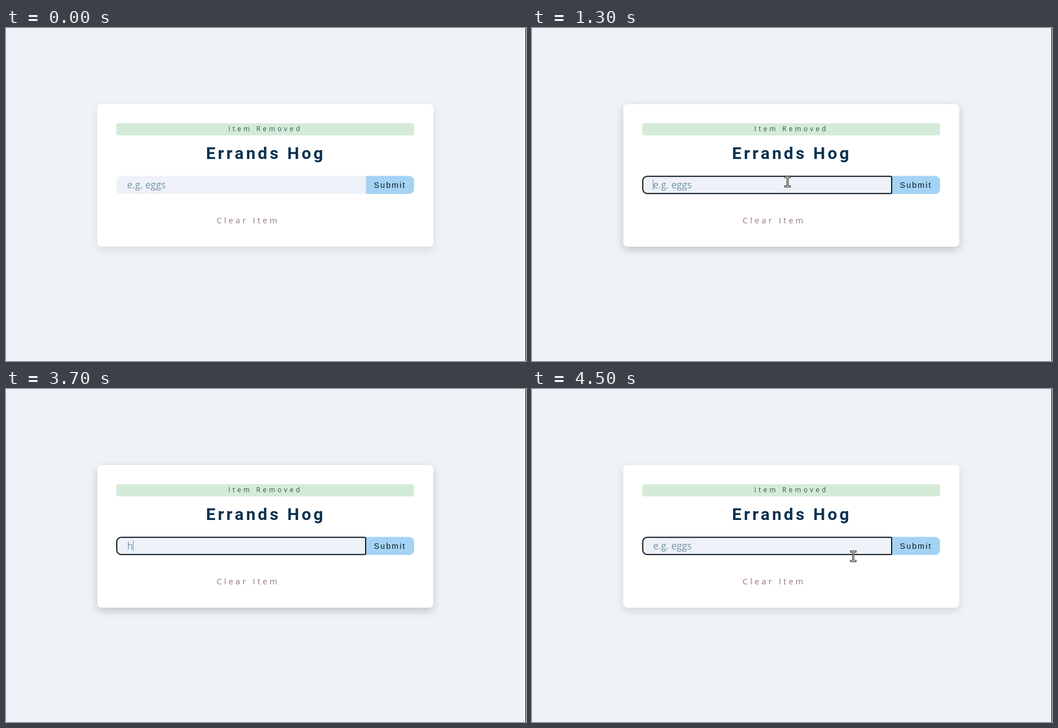
Write an HTML page with a canvas that moves like this. It is 934 px wide and 600 px high and loops after 4600 ms.

```html
<!DOCTYPE html>
<html lang="en">
<head>
<meta charset="utf-8">
<title>Shopping list</title>
<style>
  html, body { margin: 0; width: 100%; height: 100%; overflow: hidden; background: #eff3f8; }
  canvas { display: block; }
</style>
</head>
<body>
<canvas id="stage" width="934" height="600"></canvas>
<script>
const ctx = document.getElementById('stage').getContext('2d');
const LOOP = 4600, STEP = 100;
const REM = 17.23;
const WIDE = REM / 4;
const COLORS = {
  page: '#eff3f8', field: '#eef2f8', alert: '#d4ebd9', alertText: '#35514f',
  title: '#0a3150', hint: '#7093a6', submit: '#a5d3f5', ink: '#0d161d',
  clear: '#97727a', edit: '#639a78', trash: '#b96d6d', yellow: '#f3e52f'
};

function box(x, y, w, h, radius, fill) {
  ctx.beginPath();
  ctx.roundRect(x, y, w, h, radius);
  ctx.fillStyle = fill;
  ctx.fill();
}

function text(str, x, y, font, color, spacing = 0, align = 'left') {
  ctx.font = font;
  ctx.letterSpacing = spacing + 'px';
  ctx.textAlign = align;
  ctx.fillStyle = color;
  ctx.fillText(str, x, y);
  return ctx.measureText(str).width;
}

const openSans = size => `${size}px "Open Sans", sans-serif`;
const clamp01 = v => Math.min(1, Math.max(0, v));
const mix = (a, b, k) => a + (b - a) * k;

function outlined(path, fill, width = 1.2) {
  ctx.fillStyle = fill;
  ctx.strokeStyle = '#111';
  ctx.lineWidth = width;
  ctx.lineJoin = 'round';
  ctx.fill(path);
  ctx.stroke(path);
}

const pointers = {
  beam() {
    const serifs = new Path2D('M-4-8.5H-1L0-7.5L1-8.5H4M0-7.5V7.5M-4 8.5H-1L0 7.5L1 8.5H4');
    ctx.lineCap = 'square';
    for (const [width, color] of [[3.4, '#15150f'], [1.3, '#f6f3d4']]) {
      ctx.lineWidth = width;
      ctx.strokeStyle = color;
      ctx.stroke(serifs);
    }
    ctx.lineCap = 'butt';
  },
  arrow() {
    outlined(new Path2D('M0 0V16L4 12.5L7 19L10 17.5L7 11.5H12Z'), COLORS.yellow);
  },
  hand() {
    outlined(new Path2D(
      'M-1.5 1Q0-1 1.5 1V8Q3 6.5 4.5 8.5Q6 7.2 7.6 9.2Q9.5 8 11 10.5V16' +
      'Q10.5 18 9.5 20V23H0V20L-4 14.5Q-5.5 11.5-3.5 11.5L-1.5 13Z'), COLORS.yellow);
  }
};

function pointer({ kind, x, y }) {
  ctx.save();
  ctx.translate(x, y);
  pointers[kind]();
  ctx.restore();
}

function editIcon(x, y) {
  ctx.strokeStyle = ctx.fillStyle = COLORS.edit;
  ctx.lineWidth = 1.7;
  ctx.stroke(new Path2D(`M${x + 8} ${y + 2}H${x + 1}V${y + 12}H${x + 11}V${y + 8}`));
  ctx.fill(new Path2D(`M${x + 4} ${y + 10}L${x + 4.5} ${y + 7}L${x + 11} ${y + .5}L${x + 14} ${y + 3.5}L${x + 7.5} ${y + 10}Z`));
}

function trashIcon(x, y, color) {
  box(x, y + 1, 11, 1.8, .5, color);
  box(x + 3.5, y, 4, 2, .5, color);
  box(x + 1, y + 3.5, 9, 9.5, 1, color);
  ctx.fillStyle = COLORS.field;
  for (const dx of [3, 5, 7]) ctx.fillRect(x + dx, y + 5, .8, 6.3);
}

function enteringPointer(t) {
  if (t < 200) return null;
  const k = 1 - (1 - clamp01((t - 200) / 400)) ** 2;
  const y = mix(380, 277, k);
  return { kind: y < 300 ? 'beam' : 'arrow', x: mix(505, 459, k), y };
}

function stateAt(t) {
  const s = { message: 'Item Removed', typed: '', focus: false, caret: false, item: false,
              hover: clamp01((t - 100) / 300), pointer: null };
  if (t < 3700) {
    s.focus = t >= 1300;
    s.caret = s.focus && (t < 1800 || (t >= 2400 && t < 2900) || t >= 3400);
    s.pointer = enteringPointer(t);
  } else if (t < 4200) {
    s.focus = s.caret = true;
    s.typed = 'hello'.slice(0, 1 + (t - 3700) / STEP);
  } else if (t < 4400) {
    s.item = true;
    s.message = 'Item Added To The List';
    if (t >= 4300) s.pointer = { kind: 'hand', x: 705.5, y: 347.5 };
  } else if (t < 4500) {
    s.hover = .5;
    s.pointer = { kind: 'arrow', x: 648, y: 328 };
  } else {
    s.focus = true;
    s.hover = .2;
    s.pointer = { kind: 'beam', x: 577, y: 301.5 };
  }
  return s;
}

function drawCard(s) {
  ctx.save();
  ctx.shadowColor = `rgba(0,0,0,${mix(.1, .2, s.hover)})`;
  ctx.shadowBlur = 16;
  ctx.shadowOffsetY = 5.4;
  box(164, 137, 603.5, s.item ? 313.5 : 257, 7.5, '#fff');
  ctx.restore();

  box(198, 171.5, 535, 22, 4.3, COLORS.alert);
  text(s.message, 465.8, 186, openSans(REM * .7), COLORS.alertText, WIDE, 'center');
  text('Errands Hog', 466.5, 236, `bold ${REM * 1.75}px Roboto, sans-serif`, COLORS.title, WIDE, 'center');
}

function drawForm(s) {
  box(198, 266.5, 449, 32.5, [8.6, 0, 0, 8.6], COLORS.field);
  box(646.5, 266.5, 86.5, 32.5, [0, 8.6, 8.6, 0], COLORS.submit);
  text('Submit', 660.8, 287.5, '14.36px Arial, "Liberation Sans", sans-serif', COLORS.ink, 2.15);
  if (s.focus) {
    ctx.beginPath();
    ctx.roundRect(199, 267.2, 447, 31, [8, 2, 2, 8]);
    ctx.strokeStyle = COLORS.ink;
    ctx.lineWidth = 2;
    ctx.stroke();
  }
  const width = text(s.typed || 'e.g. eggs', 217.4, 288.5, openSans(REM), COLORS.hint);
  if (s.caret) {
    ctx.fillStyle = COLORS.hint;
    ctx.fillRect(s.typed ? Math.round(217.4 + width) : 217, 273, 1, 19);
  }
}

function drawList(s) {
  if (s.item) {
    box(198, 334, 535, 34, 8, COLORS.field);
    text('Hello', 215, 357.5, openSans(REM), COLORS.hint, REM / 10);
    editIcon(673, 346.5);
    trashIcon(700.5, 346.5, s.pointer ? '#2a2219' : COLORS.trash);
  }
  text('Clear Item', 378.3, s.item ? 408.5 : 352, openSans(REM * .85), COLORS.clear, WIDE);
}

function frame() {
  const t = Math.floor(performance.now() % LOOP / STEP) * STEP;
  const s = stateAt(t);
  ctx.fillStyle = COLORS.page;
  ctx.fillRect(0, 0, 934, 600);
  drawCard(s);
  drawForm(s);
  drawList(s);
  if (s.pointer) pointer(s.pointer);
  ctx.fillStyle = '#000';
  ctx.fillRect(933, 0, 1, 600);
  requestAnimationFrame(frame);
}
requestAnimationFrame(frame);
</script>
</body>
</html>
```
